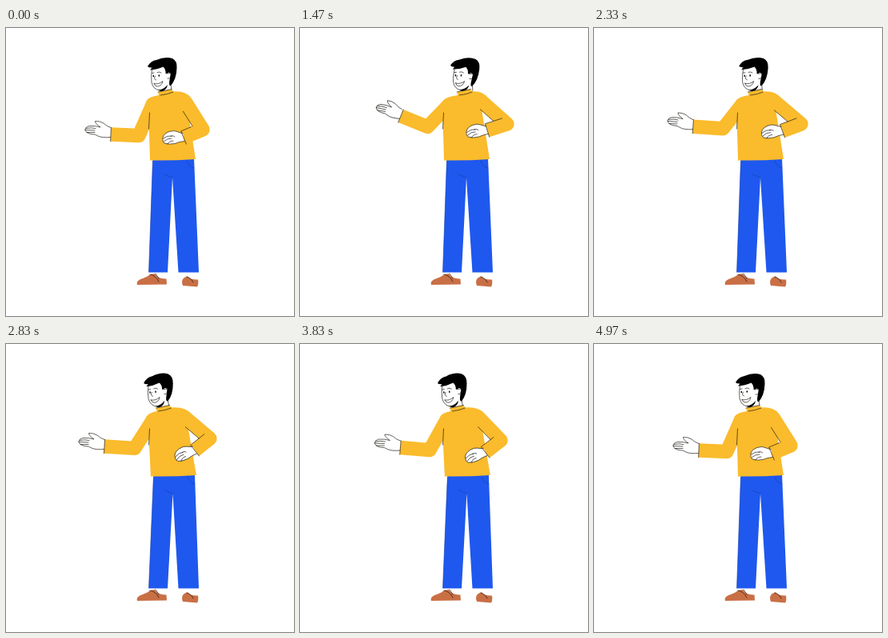
Write an HTML page that moves like this. It is 360 by 360 pixels and loops after 5.03 s.

```html
<!DOCTYPE html>
<html lang="en">
<head>
<meta charset="utf-8">
<title>Talking man</title>
<style>
  html, body { margin: 0; width: 100%; height: 100%; overflow: hidden; background: #fff; }
  svg { display: block; width: 100vw; height: 100vh; }
  .sleeve { fill: none; stroke: #fabb2c; stroke-width: 17.4; stroke-linejoin: round; }
  .yellow { fill: #fabb2c; }
  .blue { fill: #1f58ee; }
  .shoe { fill: #c96f45; }
  .line, .skin { fill: none; stroke: #15110c; stroke-width: .65; stroke-linecap: round; stroke-linejoin: round; }
  .skin { fill: #fff; }
  .seam { stroke: #173da8; stroke-width: .6; }
</style>
</head>
<body>
<svg viewBox="0 0 360 360">
  <path class="shoe" d="M164 321C162 313 174 314 180 308L186 307Q190 314 200.500 313.500L201 320.500Z"/>
  <path class="shoe" d="M221 322C218 314 223 311 227 310.500Q231 315 240 314.500Q241 320 239 323.500Z"/>
  <path class="line" d="M180 308Q187 309 191 317M187 307L191 313M226 311Q232 313 234 318"/>
  <path id="pants" class="blue"/>
  <path id="seams" class="line seam"/>

  <g id="head">
    <path fill="#fff" d="M183 50Q180 60 182 70Q186 78 192 79L194 84L208 82V50Z"/>
    <path d="M177 48Q181 41 188 40Q199 35 208 38Q214 41 213.500 50Q213 64 206 72Q203 73 204.500 65L206 57Q203 54 201.500 57L199.500 57Q200 52 196.500 48.500Q189 52 180 52.500L182.500 49.500Q179 50 177 48Z"/>
    <path d="M190 77.500Q197 77 202 71Q201 77 195 79.500Z"/>
    <path class="line" d="M182.500 52Q181 60 182 68Q184 77 192 78M206 70L207 77.500M202 57Q207 55 206 60Q205 64 202 63"/>
    <path class="line" d="M186.500 60Q184 64 187.500 65M182.500 56.500L185 56M189 55.500Q191.500 54 194 56M185 69.500Q191 71 196 66.500Q194.500 73 189 73Q186 73 185 69.500"/>
    <ellipse cx="184.300" cy="60" rx=".8" ry="1.300"/>
    <ellipse cx="191.300" cy="59.500" rx=".8" ry="1.300"/>
  </g>

  <path id="torso" class="yellow"/>
  <path id="collar" class="line"/>

  <g id="leftHand">
    <path class="skin" d="M0-8.500Q-5-10-9-14Q-14-17-19.500-16.500Q-20-14-13-9Q-19-11-27-10.500Q-32-9-32-6.500Q-32-2-25-.5Q-19-.5-16 2Q-11 4.500 0 3.500"/>
    <path class="line" d="M-31-7.500Q-25-9-19-7.500M-32-5.500L-20-5M-30-2.500L-20-2.500"/>
  </g>
  <path id="leftSleeve" class="sleeve"/>
  <path id="leftFolds" class="line"/>

  <path id="rightSleeve" class="sleeve"/>
  <g id="rightHand">
    <path class="skin" d="M-1-5.500Q-5-6-8-7.500Q-12-9.500-18-7.500Q-25-5-26 0Q-27 5-24 7Q-18 9-11 7.500Q-5 5 1 4.500"/>
    <path class="line" d="M-25.500 1Q-20-3-15-2M-25 5Q-20 .5-15 1M-20 8Q-18 4-13 4M-16-2Q-12-3-11-1"/>
  </g>
  <path id="rightFolds" class="line"/>
</svg>
<script>
const LOOP = 5030;
const CUFF = 8.7; // half the sleeve width
const el = Object.fromEntries([...document.querySelectorAll('[id]')].map(n => [n.id, n]));

const ease = (t, from, to) => {
  const s = Math.min(1, Math.max(0, (t - from) / (to - from)));
  return s * s * (3 - 2 * s);
};
// Eases from 0 to 1, holds, then eases back to 0
const gesture = (t, start, full, release, end) => ease(t, start, full) - ease(t, release, end);

const draw = (node, d) => node.setAttribute('d', d);
const place = (node, [x, y], angle) =>
  node.setAttribute('transform', `translate(${x} ${y}) rotate(${angle})`);

const along = ([x, y], [dx, dy], length) => [x + dx * length, y + dy * length];
const direction = (a, b) => {
  const x = b[0] - a[0], y = b[1] - a[1], length = Math.hypot(x, y);
  return [x / length, y / length];
};

function drawArm(sleeve, hand, shoulder, elbow, cuff, turn) {
  draw(sleeve, `M${shoulder}L${elbow}L${cuff}`);
  place(hand, cuff, turn);
  const forearm = direction(elbow, cuff), upper = direction(elbow, shoulder);
  const normal = [-forearm[1], forearm[0]];
  const reach = CUFF / Math.abs(upper[0] * forearm[1] - upper[1] * forearm[0]);
  return {
    forearm, upper,
    top: along(cuff, normal, CUFF),
    bottom: along(cuff, normal, -CUFF),
    bend: along(along(elbow, upper, reach), forearm, reach)
  };
}

function render(t) {
  const raise = gesture(t, 0, 1000, 1470, 2770);
  const spread = gesture(t, 300, 1400, 3500, 4400);
  const bow = gesture(t, 2300, 3250, 3350, 4400);

  const headShift = 7.5 * raise + 1.5 * spread - 8.5 * bow;
  const headTurn = 3.5 * raise + .5 * spread - 5.5 * bow;
  const neck = headShift * .7;
  const lean = 2 * raise + 1.5 * spread - 2.7 * bow;
  const hip = 1.6 * bow;

  draw(el.pants, `M${183.5 + hip} 163L178.500 305.500H202L${208 + hip / 2} 187L215.500 305.500H241L${235 + hip} 163Z`);
  draw(el.seams, `M${226 + hip} 166q2 7 9 9M${198 + hip} 183L${208 + hip / 2} 187M${183.5 + hip} 166L178.500 305`);
  el.head.setAttribute('transform', `translate(${headShift} 0) rotate(${headTurn} 195 76)`);

  draw(el.torso, `M${190 + neck} 80L${207 + neck} 76.500L${209 + neck} 79.500`
    + `Q${224 + lean} 78 ${231 + lean} 87L227.500 104L${237 + hip} 164`
    + `Q${208 + hip} 166 ${180 + hip} 165.500L178.700 120L${175.5 + lean} 91`
    + `Q${178 + lean} 86 ${191 + neck} 84Z`);
  draw(el.collar, `M${193 + neck} 84q9-1 16-4M${190 + neck} 80l17-3.500`);

  const left = drawArm(el.leftSleeve, el.leftHand,
    [183.5 + lean, 95],
    [166 - 2.5 * raise - 4 * spread - 2 * bow, 134.5 - 3 * raise - 8 * spread + 6.5 * bow],
    [131 + 3 * raise - 8 * spread, 133 - 18 * raise - 5 * spread],
    9 * raise);
  draw(el.leftFolds, `M${left.top}L${left.bottom}M179.500 106L178.500 126`);

  const right = drawArm(el.rightSleeve, el.rightHand,
    [224 + lean, 92],
    [246 + 13 * spread - 7 * bow, 127 - 7 * spread - 3 * bow],
    [222 - 2 * raise + 14 * spread, 137 - raise - 8 * spread + 7 * bow],
    -3 * spread - 22 * bow);
  const crease = along(right.top, right.forearm, -14 - 8 * spread);
  draw(el.rightFolds, `M${right.bottom}L${right.top}L${crease}`
    + `M${right.bend}L${along(right.bend, right.upper, 22)}`);
}

const start = performance.now();
function tick() {
  render((performance.now() - start) % LOOP);
  requestAnimationFrame(tick);
}
tick();
</script>
</body>
</html>
```
